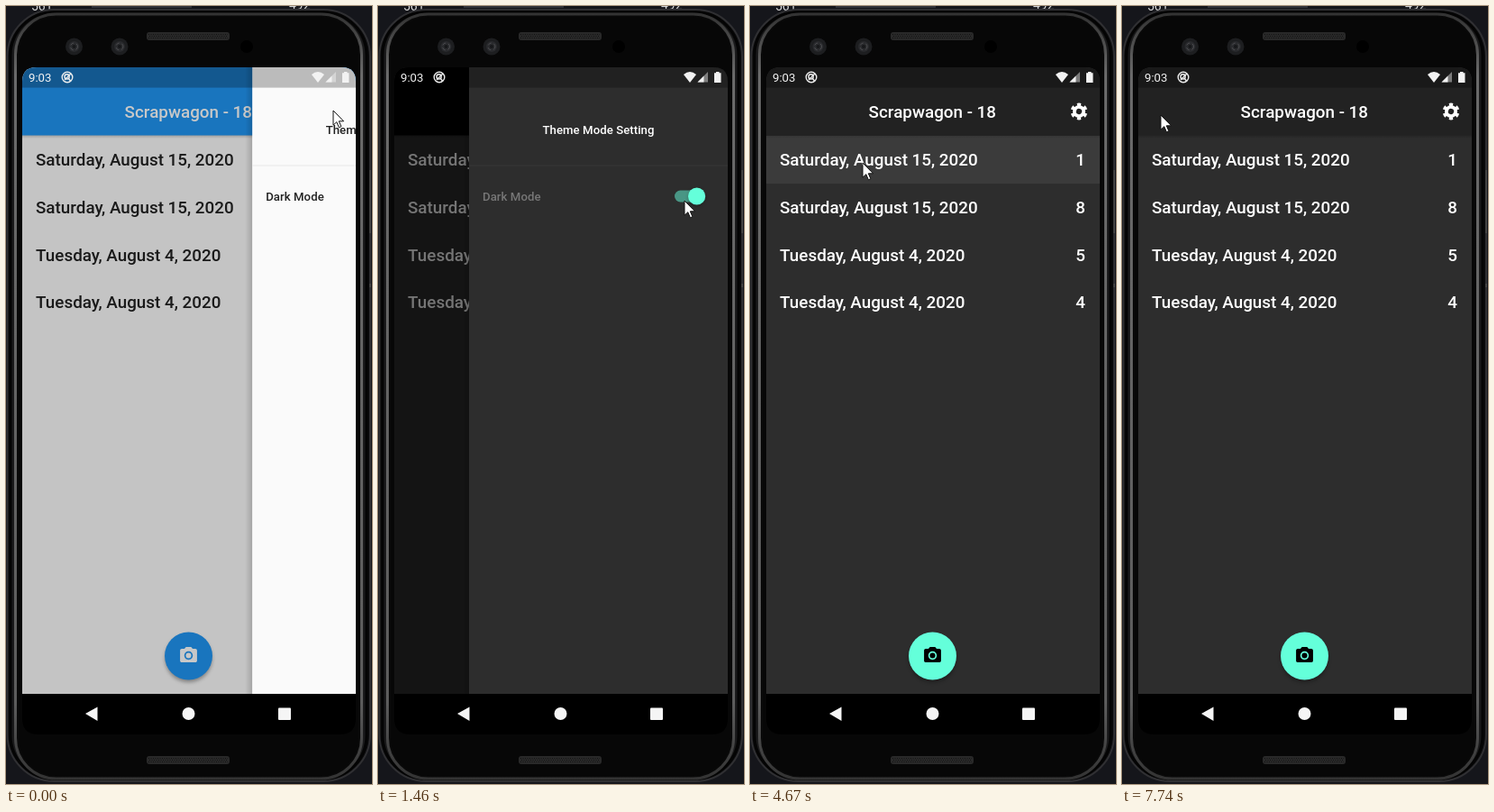
An HTML page that plays this animation: 406x863 px, repeating every 8000 ms.

```html
<!DOCTYPE html>
<html lang="en">
<head>
<meta charset="utf-8">
<title>Theme switch demo</title>
<style>
  @property --open { syntax: "<number>"; inherits: true; initial-value: 0; }
  html, body { margin: 0; width: 100%; height: 100%; overflow: hidden; background: #15161b; }
  svg { display: block; width: 406px; height: 863px; }
  text { font-family: Roboto, sans-serif; }
  .title, .row { font-size: 18.84px; font-weight: 500; }
  .small { font-size: 13.19px; }
  .bold { font-weight: 500; letter-spacing: .05px; }
  .mid { text-anchor: middle; }
  .end { text-anchor: end; }

  #app, #drawer, #cursor, #detail, #press {
    animation-duration: 8s; animation-timing-function: step-end; animation-iteration-count: infinite;
  }
  #app { animation-name: theme, drawer; }
  #cursor { animation-name: cursor; }
  #detail { animation-name: detail; }
  #press { animation-name: press; opacity: 0; }

  .page { fill: var(--page); }
  .bar { fill: var(--bar); }
  .ink { fill: var(--ink); }
  .accent { fill: var(--accent); }
  .on-accent { fill: var(--onAccent); }
  .panel { fill: var(--page); }
  .label { fill: var(--label); }
  .rule { fill: var(--rule); }
  .track { fill: var(--track); }
  .thumb { fill: var(--thumb); transform: translateX(var(--thumbX)); }
  #scrim { opacity: calc(.54 * var(--open)); }
  #drawer { transform: translateX(calc((1 - var(--open)) * 287px)); }
  #drawerShade { opacity: min(1, calc(var(--open) * 100)); }

  @keyframes theme {
    0% {
      --page: #fafafa; --bar: #2196f3; --ink: #212121; --accent: #2196f3; --onAccent: #fff;
      --label: #212121; --rule: #e9e9e9; --track: #a6a6a6; --thumb: #fafafa; --thumbX: 336px;
    }
    16.375% {
      --page: #7f7f7f; --bar: #225074; --ink: #a6a6a6; --accent: #49d5e4; --onAccent: #666;
      --label: #2a2a2a; --rule: #858585; --track: #779f96; --thumb: #a0fde7; --thumbX: 346px;
    }
    18.25% {
      --page: #2d2d2d; --bar: #000; --ink: #fff; --accent: #64ffda; --onAccent: #000;
      --label: #777; --rule: #393939; --track: #499685; --thumb: #64ffda; --thumbX: 353.6px;
    }
    19.75% { --label: #cfcfcf; }
    21.625% { --label: #fff; }
    41.875% { --bar: #222; }
  }
  @keyframes drawer {
    0% { --open: .4; }
    1.875% { --open: .9; }
    3.75% { --open: 1; }
    41.875% { --open: .75; }
    43.5% { --open: .18; }
    45.125% { --open: 0; }
  }
  @keyframes cursor {
    0% { transform: translate(363px, 116px); }
    5.75% { transform: translate(360px, 135px); }
    7.625% { transform: translate(352px, 168px); }
    9.625% { transform: translate(342px, 200px); }
    11.625% { transform: translate(338px, 210px); }
    18.25% { transform: translate(340px, 216px); }
    21.625% { transform: translate(341px, 222px); }
    23.5% { transform: translate(343px, 229px); }
    25.375% { transform: translate(344px, 236px); }
    27.375% { transform: translate(345px, 241px); }
    29.25% { transform: translate(346px, 244px); }
    30.75% { transform: translate(328px, 268px); }
    32.5% { transform: translate(260px, 350px); }
    34.375% { transform: translate(160px, 430px); }
    36.25% { transform: translate(85px, 478px); }
    38% { transform: translate(59px, 489px); }
    45.125% { transform: translate(62px, 460px); }
    46.875% { transform: translate(85px, 350px); }
    48.5% { transform: translate(115px, 220px); }
    50.125% { transform: translate(125px, 174px); }
    80.5% { transform: translate(122px, 167px); }
    82.25% { transform: translate(100px, 138px); }
    84.125% { transform: translate(70px, 113px); }
    85.875% { transform: translate(52px, 107px); }
    87.75% { transform: translate(45px, 115px); }
    89.5% { transform: translate(43px, 121px); }
  }
  @keyframes press {
    0% { opacity: 0; }
    56.875% { opacity: .07; }
    60.25% { opacity: 0; }
  }
  @keyframes detail {
    0% { opacity: 0; transform: translateY(174px); }
    58.5% { opacity: .3; transform: translateY(62px); }
    60.25% { opacity: .85; transform: translateY(6px); }
    61.875% { opacity: 1; transform: none; }
    93.375% { opacity: .6; transform: translateY(14px); }
    95% { opacity: .1; transform: translateY(95px); }
    96.75% { opacity: 0; transform: translateY(174px); }
  }
</style>
</head>
<body>
<svg viewBox="0 0 406 863">
  <defs>
    <clipPath id="screen"><path d="M18 763V84q0-16 16-16H372q16 0 16 16V763z"/></clipPath>
    <clipPath id="photoBox"><rect x="73" y="293" width="259" height="259"/></clipPath>
    <linearGradient id="edge"><stop stop-color="#000" stop-opacity="0"/><stop offset="1" stop-opacity=".16"/></linearGradient>
    <linearGradient id="barShade" x2="0" y2="1"><stop stop-opacity=".3"/><stop offset="1" stop-opacity="0"/></linearGradient>
    <linearGradient id="metal" x2="0" y2="1">
      <stop stop-color="#333"/><stop offset=".08" stop-color="#6a6a6a"/>
      <stop offset=".9" stop-color="#5c5c5c"/><stop offset="1" stop-color="#333"/>
    </linearGradient>
    <linearGradient id="wall"><stop stop-color="#947b61"/><stop offset="1" stop-color="#655039"/></linearGradient>
    <linearGradient id="sky" x2="0" y2="1"><stop stop-color="#e6ded6"/><stop offset=".62" stop-color="#d2c6ba"/><stop offset=".75" stop-color="#a89888"/><stop offset="1" stop-color="#c4b5a4"/></linearGradient>
    <linearGradient id="floor"><stop stop-color="#c2ab90"/><stop offset="1" stop-color="#775f48"/></linearGradient>
    <filter id="soft" x="-50%" y="-50%" width="200%" height="200%"><feGaussianBlur stdDeviation="2.2"/></filter>
    <g id="speaker">
      <rect width="92" height="9" rx="3" fill="#292929"/>
      <path d="M2 2.5H90M3 4.5H90M2 6.5H90" stroke="#111" stroke-dasharray="1 1.5"/>
    </g>
    <g id="lens">
      <circle r="9.5" fill="#1d1e20"/><circle r="6" fill="#292a2d"/>
      <circle r="4" fill="none" stroke="#4b4b4e" stroke-dasharray="4 3"/><circle r="2" fill="#17181a"/>
    </g>
  </defs>

  <!-- Phone body -->
  <rect width="406" height="863" fill="#15161b"/>
  <path d="M95 0H206V2H95z" fill="#33343a"/>
  <g fill="#ddd" font-size="14"><text x="28" y="5">561</text><text x="314" y="4">492</text></g>
  <rect x="1.5" y="4" width="402.5" height="856" rx="52" fill="#0c0c0d" stroke="#303033" stroke-width="2"/>
  <rect x="5" y="7" width="395" height="850" rx="48" fill="#19191a" stroke="#040404" stroke-width="3"/>
  <rect x="10.5" y="9" width="384" height="848" rx="45" fill="#090909" stroke="url(#metal)" stroke-width="3"/>
  <rect x="14" y="12" width="377" height="842" rx="42" fill="#070707"/>
  <path d="M404 182V252M404 308V312" stroke="#444" stroke-width="2"/>
  <use href="#speaker" x="156" y="29"/>
  <use href="#speaker" x="156" y="832"/>
  <use href="#lens" x="75.5" y="45"/>
  <use href="#lens" x="126" y="45"/>
  <circle cx="267" cy="45" r="7" fill="#000"/>
  <path d="M18 762H388V790q0 18-18 18H36q-18 0-18-18z" fill="#000"/>
  <g fill="#f5f5f5">
    <path d="M88 785L101.5 777.5V793z"/><circle cx="202.5" cy="785" r="7"/>
    <rect x="302" y="778.5" width="14" height="13.5" rx="1"/>
  </g>

  <g id="app" clip-path="url(#screen)">
    <!-- List -->
    <rect class="page" x="18" y="68" width="370" height="695"/>
    <rect x="18" y="143" width="370" height="4" fill="url(#barShade)" opacity=".7"/>
    <rect class="bar" x="18" y="68" width="370" height="75.5"/>
    <text class="title mid" x="202.3" y="124" fill="#fff">Scrapwagon - 18</text>
    <g transform="translate(365 117) rotate(15)" fill="none" stroke="#fff">
      <circle r="5.1" stroke-width="3.8"/>
      <circle r="7.6" stroke-width="3.6" pathLength="12" stroke-dasharray="1 1"/>
    </g>
    <rect id="press" x="18" y="144" width="370" height="53" fill="#fff"/>
    <g id="rows" class="ink row"></g>
    <circle cx="202.5" cy="724" r="26" opacity=".35" filter="url(#soft)"/>
    <circle class="accent" cx="202.5" cy="721" r="26.5"/>
    <g class="on-accent" transform="translate(191.2 709.2) scale(.942)">
      <path d="M9 2L7.17 4H4c-1.1 0-2 .9-2 2v12c0 1.1.9 2 2 2h16c1.1 0 2-.9 2-2V6c0-1.1-.9-2-2-2h-3.17L15 2H9zm3 15c-2.76 0-5-2.24-5-5s2.24-5 5-5 5 2.24 5 5-2.24 5-5 5z"/>
      <circle cx="12" cy="12" r="3.2"/>
    </g>

    <!-- Drawer -->
    <rect id="scrim" x="18" y="68" width="370" height="695"/>
    <g id="drawer">
      <rect id="drawerShade" x="93" y="68" width="8" height="695" fill="url(#edge)"/>
      <rect class="panel" x="101" y="68" width="287" height="695"/>
      <text class="small bold ink mid" x="244.5" y="142">Theme Mode Setting</text>
      <rect class="rule" x="101" y="176.5" width="287" height="1"/>
      <text class="small bold label" x="116" y="215.7">Dark Mode</text>
      <rect class="track" x="329" y="204.5" width="31.5" height="13" rx="6.5"/>
      <g class="thumb"><circle cy="212.5" r="9" fill="#000" opacity=".35" filter="url(#soft)"/><circle cy="211" r="9.6"/></g>
    </g>

    <!-- Detail -->
    <g id="detail">
      <rect x="18" y="68" width="370" height="695" fill="#2d2d2d"/>
      <rect x="18" y="68" width="370" height="75.5" fill="#222"/>
      <path d="M51.5 117H38M44.3 110.3L37.6 117L44.3 123.7" fill="none" stroke="#fff" stroke-width="1.9"/>
      <g fill="#fff">
        <text class="title mid" x="202.5" y="124">Scrapwagon</text>
        <text class="mid" x="202.5" y="225.7" font-size="23.55" font-weight="700">Saturday, August 15, 2020</text>
        <text class="mid" x="202.5" y="631" font-size="18.84">1 items</text>
        <text class="small mid" x="202.5" y="698.3">Location: (41.2085917, -118.6412238)</text>
      </g>
      <g clip-path="url(#photoBox)">
        <rect x="73" y="293" width="259" height="259" fill="url(#wall)"/>
        <path d="M73 293H238L181 341L73 331z" fill="#a8937a"/>
        <path d="M73 307L212 315M73 320L196 329M120 293L225 304" stroke="#978168"/>
        <path d="M181 341L238 293H332V500L197 470z" fill="#7c644b"/>
        <path d="M181 341L197 470" stroke="#5f4b38"/>
        <path d="M73 482L135 472L200 468L332 520V552H73z" fill="url(#floor)"/>
        <path d="M73 331L134 338V468L73 478z" fill="url(#sky)" stroke="#76634f" stroke-width="2"/>
        <path d="M73 469L134 461" stroke="#8a7762" stroke-width="2"/>
        <path d="M73 515L153 502L230 552H73z" fill="#5e4d3b"/>
        <path d="M73 534L172 514M110 552L200 532" stroke="#705d49" stroke-width="5"/>
        <path d="M139 344L176 342L184 478L134 481z" fill="#705a44"/>
        <path d="M139 365H175M139 388H178M138 413H180M137 439H182M136 465H183" stroke="#3c2f24" stroke-width="13" stroke-dasharray="4 1 6 1 3 2"/>
        <path d="M139 373H176M139 396H178M138 421H180M137 447H182M136 473H183" stroke="#9a8267" stroke-width="2"/>
        <path d="M138 343L134 482M176 342L185 479" stroke="#4b3a2a" stroke-width="3"/>
        <g fill="#c0aa90"><ellipse cx="136" cy="489" rx="9" ry="12"/><circle cx="132" cy="474" r="6"/><path d="M127 471V464L132 469L137 465V473z"/></g>
        <path d="M201 488L207 506L212 491M258 500L264 532L270 503M291 508L298 540L303 510" fill="#4c3b2b"/>
        <path d="M196 454L229 448L332 463V528L196 489z" fill="#806850"/>
        <path d="M196 454L229 448L332 463V471z" fill="#957b60"/>
        <path d="M260 462V507" stroke="#665039"/>
        <path d="M234 454L270 450L305 459L270 464z" fill="#332a21"/>
        <path d="M214 382L306 363V456L215 447z" fill="#0c0c0c" stroke="#29231a" stroke-width="2"/>
        <path id="checks" fill="#b3b4b8"/>
        <path d="M216 428L226 429V446L216 445z" fill="#00a000"/>
      </g>
    </g>

    <!-- Status bar -->
    <rect x="18" y="68" width="370" height="22.6" opacity=".25"/>
    <g fill="#f2f2f2">
      <text class="small" x="25" y="84">9:03</text>
      <g fill="none" stroke="#eee" stroke-width="1.4"><circle cx="68" cy="79" r="5.8"/><circle cx="67.6" cy="78.4" r="2.6"/><path d="M65 82L72 75M69 80L71.5 83"/></g>
      <path d="M339 76Q346 70 353 76L346 85z"/>
      <path d="M366 73V84.5H354.5z" opacity=".45"/><path d="M361.5 77.5V84.5H354.5z"/>
      <path d="M373 74.2H375V73H378.5V74.2H380.5V85H373z"/>
    </g>
  </g>

  <path id="cursor" d="M0 0V16.2L3.8 12.7L6.4 18.8L8.9 17.7L6.3 11.8H11.6z" fill="#fff" stroke="#111" stroke-width="1"/>
</svg>
<script>
  const entries = [
    ["Saturday, August 15, 2020", 1], ["Saturday, August 15, 2020", 8],
    ["Tuesday, August 4, 2020", 5], ["Tuesday, August 4, 2020", 4],
  ];
  document.getElementById("rows").innerHTML = entries.map(([date, count], i) => {
    const y = 177 + i * 52.75;
    return `<text x="33" y="${y}">${date}</text><text class="end" x="372" y="${y}">${count}</text>`;
  }).join("");

  // Checkerboard in perspective on the television
  const cols = 11, rows = 9;
  const point = (c, r) => {
    const u = (c / cols) * (.8 + .2 * c / cols), v = r / rows;
    const top = 384 - 17 * u, bottom = 444 + 9 * u;
    return `${(217 + 86 * u).toFixed(1)} ${(top + (bottom - top) * v).toFixed(1)}`;
  };
  let checks = "";
  for (let r = 0; r < rows; r++)
    for (let c = r % 2; c < cols; c += 2)
      checks += `M${point(c, r)}L${point(c + 1, r)}L${point(c + 1, r + 1)}L${point(c, r + 1)}z`;
  document.getElementById("checks").setAttribute("d", checks);
</script>
</body>
</html>
```
